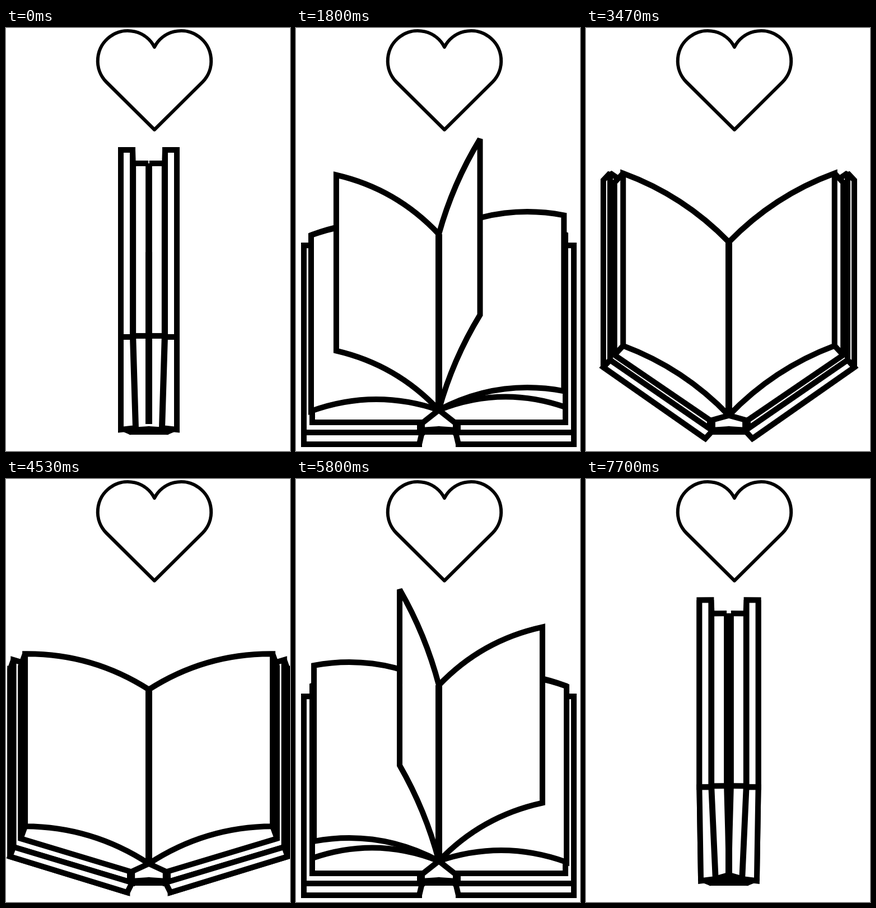
An HTML page with a canvas for the animation above (7730 ms loop, 507 px wide and 753 px high).

```html
<!DOCTYPE html>
<html lang="en">
<head>
<meta charset="utf-8">
<title>Book and heart</title>
<style>
html, body { margin: 0; width: 100%; height: 100%; overflow: hidden; background: #fff; }
canvas { display: block; }
</style>
</head>
<body>
<canvas id="stage" width="507" height="753"></canvas>
<script>
const ctx = document.getElementById('stage').getContext('2d');
const LOOP = 7730, CYCLE = 3885, MID = 255;
const FLIPS = 6, FIRST_FLIP = 946, FLIP_GAP = 237, FLIP = 880;
const heart = new Path2D(
  'M265 181L179 96A53.6 53.6 0 1 1 265 34A53.6 53.6 0 1 1 351 96Z');

const clamp = v => Math.max(0, Math.min(1, v));
const ease = v => (1 - Math.cos(Math.PI * clamp(v))) / 2;
const add = (p, x, y) => [p[0] + x, p[1] + y];
const up = (p, h) => add(p, 0, -h);
const polar = (p, len, deg) => {
  const a = deg * Math.PI / 180;
  return add(p, -len * Math.cos(a), -len * Math.sin(a));
};

function trace(pts) {
  ctx.beginPath();
  pts.forEach(p => ctx.lineTo(...p));
}

function line(...pts) {
  trace(pts);
  ctx.stroke();
}

function fill(color, ...pts) {
  trace(pts);
  ctx.closePath();
  ctx.fillStyle = color;
  ctx.fill();
}

function shape(color, ...pts) {
  fill(color, ...pts);
  ctx.stroke();
}

// Control point of an edge that bulges upwards
function bulge(a, b, bow) {
  const dx = b[0] - a[0], dy = b[1] - a[1];
  const k = 2 * bow * (dx < 0 ? -1 : 1) / (Math.hypot(dx, dy) || 1);
  return [(a[0] + b[0]) / 2 + dy * k, (a[1] + b[1]) / 2 - dx * k];
}

function page(edge, edgeTop, spine, spineTop, bow) {
  ctx.beginPath();
  ctx.moveTo(...spineTop);
  ctx.quadraticCurveTo(...bulge(spineTop, edgeTop, bow), ...edgeTop);
  ctx.lineTo(...edge);
  ctx.quadraticCurveTo(...bulge(edge, spine, bow), ...spine);
  ctx.closePath();
  ctx.fillStyle = '#fff';
  ctx.fill();
  ctx.stroke();
}

const spineBottom = c => [MID, 680 + 25 * c];
const spineTop = c => up(spineBottom(c), 313 - 7 * Math.sqrt(c));

// Left half of the book; c runs from 0 (open) to 1 (closed)
function half(c) {
  const s = Math.sin(c * Math.PI / 2);
  const coverH = 333, pageH = 307;

  const hinge = [220 - 20 * c + 5 * c * c, 741 - 26 * c];
  const innerHinge = [225 + 6 * c * c, 720 - 8 * c];
  const outer = polar(hinge, 206 + 93 * c - 134 * c * c, 90 * c);
  const inner = add(outer, 21 * s, -21 * (1 - c));
  shape('#fff', outer, up(outer, coverH), up(hinge, coverH), hinge);
  shape('#fff', inner, up(inner, coverH), up(innerHinge, coverH), innerHinge);
  shape('#fff', outer, up(outer, coverH), up(inner, coverH), inner);
  shape('#fff', outer, inner, innerHinge, hinge);

  const root = [227 - 24 * c + 29 * c * c, 702 - 20 * c + 30 * c * c];
  const base = polar(root, 198 + 60 * c - 94 * c * c, 88.3 * c);
  const edge = add(base, 27 * s, -27 * (1 - c));
  const baseTop = up(base, pageH), edgeTop = up(edge, pageH);
  const bottom = spineBottom(c), top = spineTop(c);
  fill('#fff', root, base, baseTop, edgeTop, top, bottom);
  line(edgeTop, baseTop, base, root);
  line(base, edge);
  if (c < 1) line(root, bottom);
  page(edge, edgeTop, bottom, top, 21 * (1 - c));

  line([221, root[1]], [221, 716]);
  ctx.lineWidth = 4;
  shape('#000', hinge, innerHinge, [222, 722]);
  shape('#000', [223, 713], [MID, 711], [MID, 722], [222, 722]);
  ctx.lineWidth = 10;
}

function turningPage(a) {
  const edge = [MID + 228 * Math.cos(a), 683 - 182 * Math.sin(a)];
  page(edge, up(edge, 313), spineBottom(0), spineTop(0), 20 * Math.abs(Math.cos(a)));
}

function draw(t) {
  const u = t % CYCLE;
  const c = u < 2000 ? 1 - ease((u - 160) / 681) : ease((u - 3180) / 680);

  ctx.setTransform(1, 0, 0, 1, 0, 0);
  ctx.fillStyle = '#fff';
  ctx.fillRect(0, 0, 507, 753);
  ctx.lineJoin = 'round';
  ctx.lineWidth = 6;
  ctx.stroke(heart);

  ctx.lineJoin = 'miter';
  ctx.miterLimit = 2;
  ctx.lineWidth = 10;
  half(c);
  ctx.setTransform(-1, 0, 0, 1, 2 * MID, 0);
  half(c);
  ctx.setTransform(1, 0, 0, 1, 0, 0);

  // Flattest pages first, so upright ones cover them
  Array.from({ length: FLIPS }, (_, i) => (u - FIRST_FLIP - i * FLIP_GAP) / FLIP)
    .filter(p => p > 0 && p < 1)
    .map(p => Math.PI * ease(p))
    .sort((a, b) => Math.abs(Math.cos(b)) - Math.abs(Math.cos(a)))
    .forEach(turningPage);

  ctx.lineWidth = 12;
  line(spineTop(c), spineBottom(c));
}

function tick() {
  draw(performance.now() % LOOP);
  requestAnimationFrame(tick);
}
tick();
</script>
</body>
</html>
```
